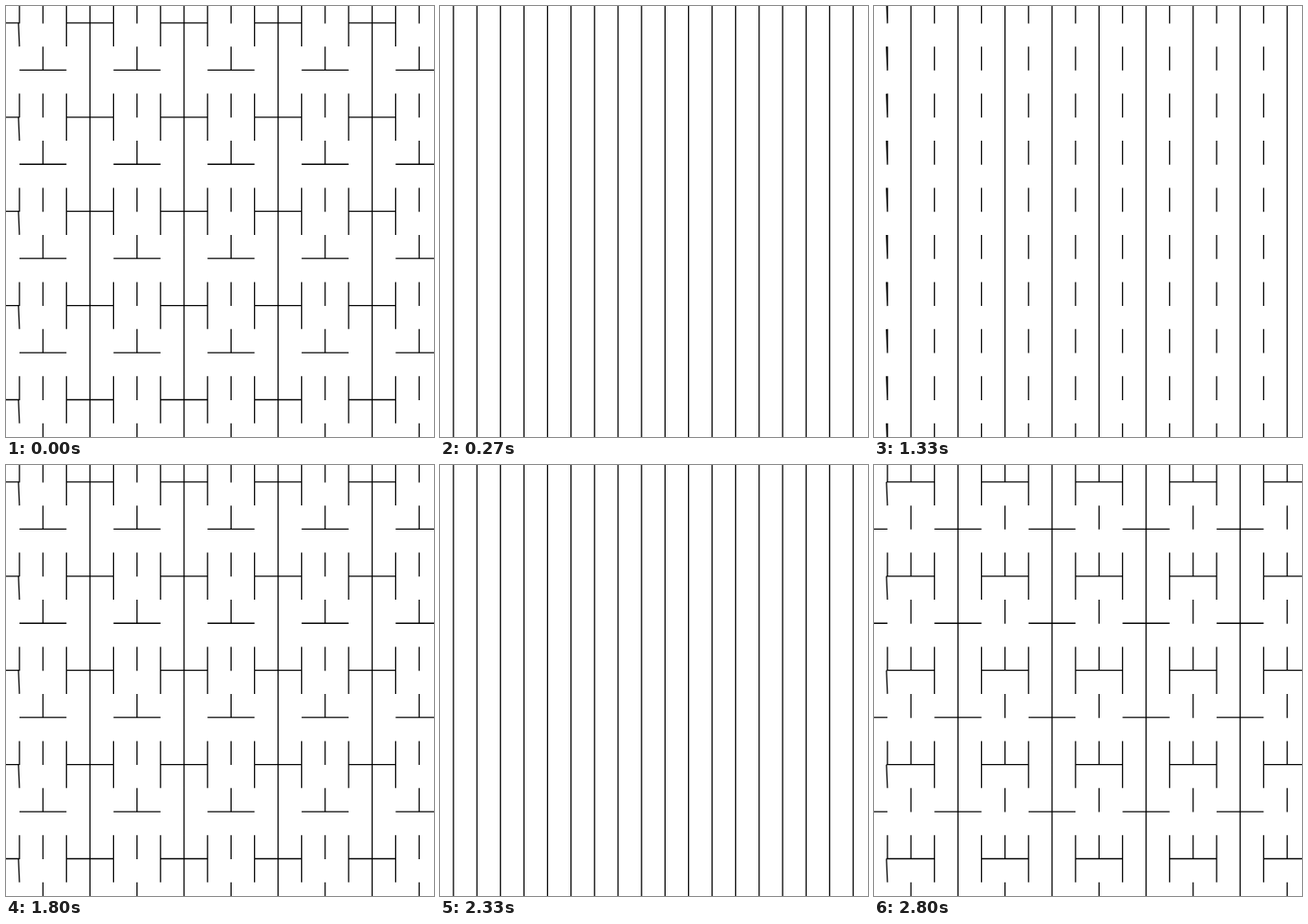
Animation of 476x480 px, one loop 3.07 s. Source, as an HTML page:

```html
<!DOCTYPE html>
<html lang="en">
<head>
<meta charset="utf-8">
<title>Folding lines</title>
<style>
  html, body { margin: 0; width: 100%; height: 100%; overflow: hidden; background: #fff; }
  svg { display: block; width: 476px; height: 480px; }
  path { fill: none; stroke: #000; stroke-width: 1.3; visibility: hidden; animation: 3070ms step-end infinite; }
  #bridges { animation-name: bridges; }
  #stripes { animation-name: stripes; }
  #cups { animation-name: cups; }
  #dashes { animation-name: dashes; }
  @keyframes bridges {
    0%, 58.6319% { visibility: visible; }
    8.7948%, 75.8958%, 100% { visibility: hidden; }
  }
  @keyframes stripes {
    0%, 26.0586%, 91.2052%, 100% { visibility: hidden; }
    8.7948%, 75.8958% { visibility: visible; }
  }
  @keyframes cups {
    0%, 43.3225%, 100% { visibility: hidden; }
    26.0586%, 91.2052% { visibility: visible; }
  }
  @keyframes dashes {
    0%, 58.6319%, 100% { visibility: hidden; }
    43.3225% { visibility: visible; }
  }
</style>
</head>
<body>
<svg viewBox="0 0 476 480">
  <path id="bridges"/>
  <path id="stripes"/>
  <path id="cups"/>
  <path id="dashes"/>
</svg>
<script>
  const COLUMNS = 18, ROWS = 10, HALF = 26.2, LEAN = 1.1;
  const colX = k => 14.95 + 26.15 * k;
  const rowY = n => 18.9 + 52.45 * n;
  const line = (x1, y1, x2, y2) => `M${x1} ${y1}L${x2} ${y2}`;
  const full = k => line(colX(k), 0, colX(k), 480);
  const dash = (k, n) => line(colX(k), rowY(n) - HALF, colX(k), rowY(n) + .5);

  // Uprights joined by crossbars; shift moves the bars two columns along.
  function lattice(shift) {
    let d = '';
    for (let k = 0; k < COLUMNS; k++) {
      if (k % 4 === 3) { d += full(k); continue; }
      for (let n = 0; n < ROWS; n++) {
        if (k % 2) d += dash(k, n);
        else if (n % 2 === 0) {
          d += dash(k, n);
          d += line(colX(k) - (k ? 0 : LEAN), rowY(n), colX(k), rowY(n) + HALF);
        }
      }
    }
    for (let n = 0; n < ROWS; n++) {
      const first = (n % 2 ? 2 : 0) + shift;
      for (let k = first % 4 - 4; k < COLUMNS; k += 4) {
        const start = colX(k) - (k === 0 && n % 2 === 0 ? LEAN : 0);
        d += line(start, rowY(n), colX(k + 2), rowY(n));
      }
    }
    return d;
  }

  function stripes() {
    let d = '';
    for (let k = 0; k < COLUMNS; k++) d += full(k);
    return d;
  }

  function dashes() {
    let d = '';
    for (let k = 0; k < COLUMNS; k++) {
      if (k % 2) { d += full(k); continue; }
      for (let n = 0; n < ROWS; n++) {
        d += dash(k, n);
        if (k === 0) d += line(colX(0) - LEAN, rowY(n) - HALF, colX(0), rowY(n) + .5);
      }
    }
    return d;
  }

  const draw = (id, d) => document.getElementById(id).setAttribute('d', d);
  draw('bridges', lattice(2));
  draw('stripes', stripes());
  draw('cups', lattice(0));
  draw('dashes', dashes());
</script>
</body>
</html>
```
